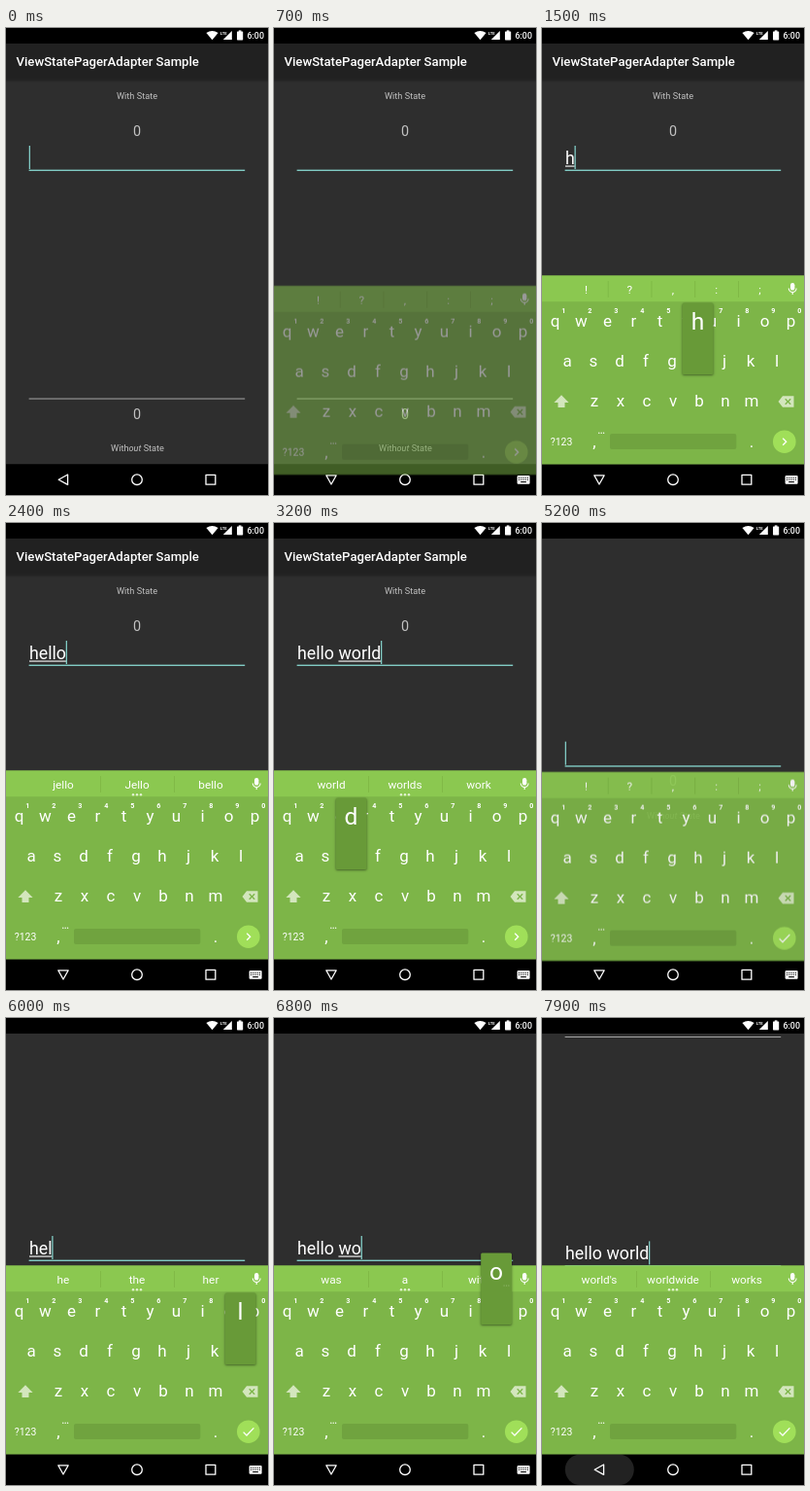
These frames come from a looping animation (270x480 px, 8 s). An HTML page with a canvas:

```html
<!DOCTYPE html>
<html lang="en">
<head>
<meta charset="utf-8">
<title>ViewStatePagerAdapter Sample</title>
<style>
html, body { margin: 0; width: 270px; height: 480px; overflow: hidden; background: #000; }
canvas { display: block; width: 270px; height: 480px; }
</style>
</head>
<body>
<canvas id="stage"></canvas>
<script>
const LOOP = 8000, STEP = 100, BLINK = 500;
const TEAL = '#80cbc4', WHITE = '#fff', SOFT = '#c1c1c1';
const BAR = '#8bc850', KEYS = '#7db548', DARK = '#689a38', PALE = '#d3e6bd';
const TOP = 15.8, NAV = 448.5, KB = 254.5, SHIFT = 132;
const scale = window.devicePixelRatio || 1;
const stage = document.getElementById('stage');
const layer = document.createElement('canvas');
for (const c of [stage, layer]) { c.width = 270 * scale; c.height = 480 * scale; }
const main = stage.getContext('2d'), kb = layer.getContext('2d');
for (const g of [main, kb]) g.scale(scale, scale);

const ROWS = [['qwertyuiop', 13.5, 302], ['asdfghjkl', 26, 343], ['zxcvbnm', 54, 384]];
const HINTS = {
  '': '! ? , : ;',
  h: 'he I have',
  he: 'he the her',
  hel: 'help hello held',
  hell: 'hello hell he\'ll',
  hello: 'jello Jello bello',
  'hello ': 'I the and',
  'hello w': 'was a with',
  'hello wo': 'would work won\'t',
  'hello wor': 'work word world',
  'hello worl': 'world worlds work',
  'hello world': 'world\'s worldwide works'
};
const PHRASE = 'hello world';

// Key times at an even pace, with an optional pause before the second word.
const pace = (start, gap, pause) =>
  [...PHRASE].map((_, i) => start + gap * i + (i > 4 ? pause : 0));
const RUN_A = pace(1410, 140, 350), RUN_B = pace(5650, 160, 0);
const RESETS = [-200, ...RUN_A, 3400, 3900, 4800, 5200, ...RUN_B, 7700];

const typed = (run, t) => PHRASE.slice(0, run.filter(k => k <= t).length);
const ramp = (t, from, span) => Math.min(1, Math.max(0, (t - from) / span));
const easeIn = u => u ** 3;
const easeOut = (u, p) => 1 - (1 - u) ** p;

const opening = (t, p) => easeOut(ramp(t, t < 4800 ? 600 : 4958, 330), p);
const kbAlpha = t => opening(t, 2) * (t < 4800 ? 1 - easeIn(ramp(t, 4000, 190)) : 1);
const pan = t => t < 4800 ? 0 : SHIFT * (opening(t, 4) - easeIn(ramp(t, 7800, 290)));
const ripple = t => t < 4800
  ? Math.min(ramp(t, 3700, 300), 1 - ramp(t, 4100, 400))
  : ramp(t, 7600, 300);
const kbOpen = t => (t >= 500 && t < 4000) || (t >= 5000 && t < 7800);
const cursorOn = t => (t - Math.max(...RESETS.filter(r => r <= t))) % (2 * BLINK) < BLINK;

function rect(g, x, y, w, h, color) {
  g.fillStyle = color;
  g.fillRect(x, y, w, h);
}
function round(g, x, y, w, h, r, color) {
  g.fillStyle = color;
  g.beginPath();
  g.roundRect(x, y, w, h, r);
  g.fill();
}
function disc(g, x, y, r, color) {
  g.fillStyle = color;
  g.beginPath();
  g.arc(x, y, r, 0, 7);
  g.fill();
}
function path(g, pts, close) {
  g.beginPath();
  pts.forEach(p => g.lineTo(p[0], p[1]));
  if (close) g.closePath();
}
function text(g, s, x, y, size, color = WHITE, align = 'center', style = '400') {
  g.font = `${style} ${size}px Roboto, sans-serif`;
  g.textAlign = align;
  g.fillStyle = color;
  g.fillText(s, x, y);
  return g.measureText(s).width;
}
function dots(g, x, y, gap, r, color) {
  for (let i = -1; i < 2; i++) disc(g, x + i * gap, y, r, color);
}

function field(g, line, value, focused, composing, cursor) {
  rect(g, 23.6, line - .7, 222.6, focused ? 1.4 : .9, focused ? TEAL : '#b4b4b4');
  const base = line - 6.3;
  const w = value ? text(g, value, 24, base, 17.8, WHITE, 'left') : 0;
  if (composing) {
    const start = value.indexOf(' ') + 1;
    const x = 24 + g.measureText(value.slice(0, start)).width;
    rect(g, x, base + 1.5, 24 + w - x, 1.1, WHITE);
  }
  if (focused && cursor) rect(g, 23.7 + w, line - 25.3, 1.3, 24, TEAL);
}

function content(g, t) {
  const second = t >= 4800, cursor = cursorOn(t);
  g.save();
  g.beginPath();
  g.rect(0, TOP, 270, NAV - TOP);
  g.clip();
  rect(g, 0, TOP, 270, NAV - TOP, '#2e2e2e');
  g.translate(0, -pan(t));
  const shade = g.createLinearGradient(0, 52.5, 0, 56);
  shade.addColorStop(0, 'rgba(0,0,0,.3)');
  shade.addColorStop(1, 'rgba(0,0,0,0)');
  rect(g, 0, 52.5, 270, 3.5, shade);
  rect(g, 0, 0, 270, 52.5, '#212121');
  text(g, 'ViewStatePagerAdapter Sample', 10.5, 39.3, 13.15, WHITE, 'left', '500');

  text(g, 'With State', 135, 72.8, 9.2, SOFT);
  text(g, '0', 135, 110.8, 14.4, SOFT);
  const a = typed(RUN_A, t), b = typed(RUN_B, t);
  field(g, 146.3, a, !second, !a.endsWith(' ') && t < 3800, cursor);
  field(g, 381.3, b, second, !b.endsWith(' ') && t < 7700, cursor);
  text(g, '0', 135, 401.8, 14.4, SOFT);

  let x = 108;
  for (const [part, style] of [['With', '400'], ['out', 'italic 400'], [' State', '400']])
    x += text(g, part, x, 435.4, 9.2, SOFT, 'left', style);
  g.restore();
}

function mic(g) {
  round(g, 256, 262, 4.4, 7.6, 2.2, WHITE);
  g.strokeStyle = WHITE;
  g.lineWidth = 1.1;
  g.beginPath();
  g.arc(258.2, 267.6, 3.9, 0, Math.PI);
  g.moveTo(258.2, 271.5);
  g.lineTo(258.2, 274);
  g.stroke();
}

function suggestions(g, words) {
  const three = words.length === 3, gap = three ? 76 : 44.8;
  words.forEach((w, i) => {
    const x = 135 + (i - (words.length - 1) / 2) * gap;
    text(g, w, x, 272.8, 11.8);
    if (i) rect(g, x - gap / 2, 260, .7, 17, '#7bb342');
  });
  if (three) dots(g, 135, 279.2, 4, 1.2, '#e4f2d4');
}

function keyboard(g, t) {
  const second = t >= 4800, run = second ? RUN_B : RUN_A;
  rect(g, 0, KB, 270, NAV - KB, KEYS);
  rect(g, 0, KB, 270, 26.7, BAR);
  suggestions(g, HINTS[typed(run, t - STEP)].split(' '));
  mic(g);

  ROWS.forEach(([chars, x0, y], row) => [...chars].forEach((c, i) => {
    const x = x0 + 27 * i;
    text(g, c, x, y + 5.2, 17);
    if (!row) text(g, (i + 1) % 10, x + 8.8, 293.2, 7.2, WHITE, 'center', '700');
  }));

  g.fillStyle = PALE;
  path(g, [[20, 377.3], [27.6, 385], [12.4, 385]], true);
  g.fill();
  rect(g, 16.5, 385, 7, 5, PALE);
  path(g, [[243.5, 384], [248, 378.2], [259.5, 378.2], [259.5, 389.8], [248, 389.8]], true);
  g.fill();
  g.strokeStyle = KEYS;
  g.lineWidth = 1.3;
  for (const d of [-2.75, 2.75]) {
    path(g, [[253.45 - d, 384 - 2.75], [253.45 + d, 384 + 2.75]]);
    g.stroke();
  }

  text(g, '?123', 20, 428.8, 10.4);
  text(g, ',', 54, 430.5, 17);
  dots(g, 61.2, 416.2, 2.4, .7, WHITE);
  round(g, 70, 417, 130.3, 16, 2, '#70a33f');
  text(g, '.', 216, 430.5, 17);
  disc(g, 249.8, 425.2, 11.8, '#a0df59');
  g.strokeStyle = WHITE;
  path(g, second ? [[244.6, 425.6], [248, 429], [255.4, 421.4]] : [[248.2, 421.7], [251.7, 425.2], [248.2, 428.7]]);
  g.stroke();

  run.forEach((k, i) => {
    const from = i ? Math.max(k - STEP, run[i - 1] + STEP) : k - STEP;
    if (t >= from && t < k + STEP && PHRASE[i] !== ' ') popup(g, PHRASE[i]);
  });
}

function popup(g, c) {
  const [chars, x0, y] = ROWS.find(r => r[0].includes(c));
  const x = x0 + 27 * chars.indexOf(c) - .5;
  g.save();
  g.shadowColor = 'rgba(0,0,0,.45)';
  g.shadowBlur = 2.5 * scale;
  g.shadowOffsetY = scale;
  round(g, x - 15.8, y - 60.5, 31.8, 73.5, 1.5, DARK);
  g.restore();
  text(g, c, x, y - 33.5, 24.6);
  if (chars === ROWS[0][0]) dots(g, x + 10.5, y - 27, 2.4, .6, '#9dbf7c');
}

function statusBar(g) {
  rect(g, 0, 0, 270, TOP, '#000');
  g.fillStyle = WHITE;
  g.beginPath();
  g.moveTo(212.5, 12.2);
  g.lineTo(206.4, 5);
  g.quadraticCurveTo(212.5, .8, 218.6, 5);
  g.fill();
  path(g, [[223.8, 12], [232.8, 12], [232.8, 3]], true);
  g.fill();
  rect(g, 220.5, 2.5, 7, 5, '#000');
  text(g, 'LTE', 224.2, 6.8, 4.2, WHITE, 'center', '700');
  round(g, 238, 3.4, 6.2, 9, .7, WHITE);
  rect(g, 239.8, 2.4, 2.6, 1.5, WHITE);
  text(g, '6:00', 257.2, 11.4, 8.9, WHITE, 'center', '500');
}

function navButtons(g, t) {
  const r = ripple(t), open = kbOpen(t);
  if (r) {
    const w = 71 * (.5 + r / 2);
    g.globalAlpha = r;
    round(g, 59.3 - w / 2, NAV, w, 31.5, 15.7, '#222');
    g.globalAlpha = 1;
  }
  g.strokeStyle = WHITE;
  g.lineWidth = 1.3;
  g.lineJoin = 'round';
  path(g, open ? [[53.8, 459.8], [64.2, 459.8], [59, 469]] : [[63.6, 459], [63.6, 469.4], [54.2, 464.2]], true);
  g.stroke();
  g.beginPath();
  g.arc(135, 464.2, 5.3, 0, 7);
  g.stroke();
  g.strokeRect(206, 459.4, 9.8, 9.8);
  if (open) {
    round(g, 250.6, 460, 13, 8.8, 1, WHITE);
    for (let i = 0; i < 10; i++)
      rect(g, 252 + i % 5 * 2.2, 461.6 + (i > 4 ? 2.1 : 0), 1.1, 1.1, '#000');
    rect(g, 254.2, 466, 5.8, 1.1, '#000');
  }
}

function draw(t) {
  rect(main, 0, 0, 270, 480, '#000');
  content(main, t);
  navButtons(main, t);
  const alpha = kbAlpha(t);
  if (alpha) {
    kb.clearRect(0, 0, 270, 480);
    keyboard(kb, t);
    main.globalAlpha = alpha;
    main.drawImage(layer, 0, (1 - alpha) * 22, 270, 480);
    main.globalAlpha = 1;
  }
  statusBar(main);
}

const start = performance.now();
function tick() {
  const t = (performance.now() - start) % LOOP;
  draw(Math.floor(t / STEP) * STEP);
  requestAnimationFrame(tick);
}
tick();
</script>
</body>
</html>
```
